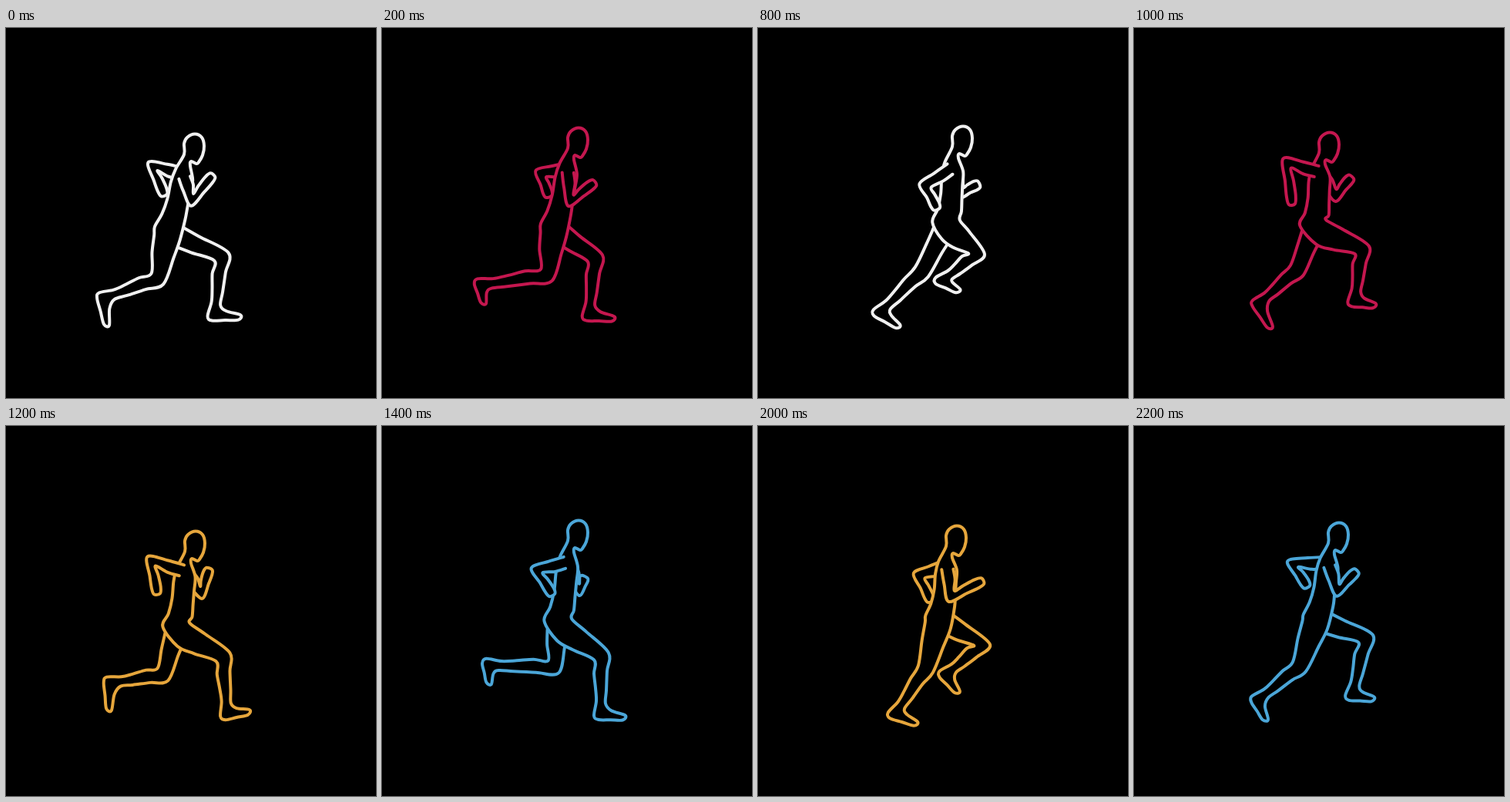
Animation of 480x480 px, one loop 2.4 s. Source, as an HTML page:

```html
<!DOCTYPE html>
<html lang="en">
<head>
<meta charset="utf-8">
<title>Running figure</title>
<style>
html, body { margin: 0; width: 100%; height: 100%; overflow: hidden; background: #000; }
svg { display: block; width: 100%; height: 100%; }
path { fill: #000; stroke-width: 4; stroke-linecap: round; stroke-linejoin: round; }
</style>
</head>
<body>
<svg viewBox="0 0 480 480"></svg>
<script>
const STEP = 200;
const COLORS = ['#f0f0f0', '#c4174f', '#e6a63c', '#4ba6d8'];
const svg = document.querySelector('svg');
const poses = [];

const add = (p, v, k = 1) => [p[0] + v[0] * k, p[1] + v[1] * k];
const mix = (a, b, t) => [a[0] + (b[0] - a[0]) * t, a[1] + (b[1] - a[1]) * t];
const unit = v => v.map(c => c / (Math.hypot(...v) || 1));
const dir = (a, b) => unit([b[0] - a[0], b[1] - a[1]]);
const normal = (a, b) => { const [x, y] = dir(a, b); return [y, -x]; };

// Point at share t of the bone a-b, w pixels towards the front of the body.
const beside = (a, b, t, w) => add(mix(a, b, t), normal(a, b), w);
const joint = (a, b, c, w) => add(b, unit(add(normal(a, b), normal(b, c))), w);

// Outline of a leg, from the back of the thigh round the foot to the front.
function leg(hip, [kx, ky, ax, ay, tx, ty], wide) {
  const knee = [kx, ky], ankle = [ax, ay], toe = [tx, ty];
  const thigh = (t, w) => beside(hip, knee, t, w * wide);
  const shin = (t, w) => beside(knee, ankle, t, w);
  const heel = (down, w) => add(shin(1, w), dir(knee, ankle), down);
  const tip = beside(ankle, toe, 1, -4);
  return [
    thigh(.15, -18), thigh(.5, -15), joint(hip, knee, ankle, -10),
    shin(.35, -9), shin(.65, -7), shin(.92, -6),
    heel(14, -9), heel(19, -3), mix(heel(19, -3), tip, .5), tip,
    beside(ankle, toe, 1, 3), beside(ankle, toe, .45, 0), shin(.97, 6),
    shin(.7, 7), shin(.3, 8), joint(hip, knee, ankle, 11),
    thigh(.5, 14), thigh(.12, 16)
  ];
}

// Outline of an arm, open at the shoulder.
function arm(shoulder, [ex, ey, wx, wy]) {
  const elbow = [ex, ey], wrist = [wx, wy];
  const upper = (t, w) => beside(shoulder, elbow, t, w);
  const lower = (t, w) => beside(elbow, wrist, t, w);
  return [
    upper(.1, -8), upper(.6, -8), joint(shoulder, elbow, wrist, -10),
    lower(.5, -6), lower(.95, -6), lower(1.2, -4), lower(1.2, 4), lower(.95, 6),
    lower(.5, 5), joint(shoulder, elbow, wrist, 6), upper(.5, 7), upper(.15, 7)
  ];
}

function body(head, neck, hip, nearLeg) {
  const torso = (t, w) => beside(neck, hip, t, w);
  const face = [
    [-5, 24], [-4, 18], [3, 21], [6, 19], [11, 10], [13, -2], [10, -13],
    [1, -17.5], [-9, -13], [-13, -5], [-13, 9]
  ].map(p => add(head, p));
  return [
    torso(.1, -12), torso(.3, -14), torso(.55, -13), torso(.78, -15), torso(.98, -20),
    ...leg(hip, nearLeg, 1),
    torso(.78, 16), torso(.6, 15), torso(.4, 14), torso(.2, 13), ...face
  ];
}

// Catmull-Rom curve through the points.
function smooth(pts, closed) {
  const n = pts.length;
  const at = i => pts[closed ? (i + n) % n : Math.max(0, Math.min(n - 1, i))];
  const handle = (i, side) => {
    const a = at(i - 1), b = at(i + 1);
    return add(at(i), [b[0] - a[0], b[1] - a[1]], side / 6);
  };
  let d = 'M' + pts[0];
  for (let i = 1; i < n + (closed ? 1 : 0); i++) {
    d += 'C' + [handle(i - 1, 1), handle(i, -1), at(i)].join(' ');
  }
  return d;
}

// Legs are knee, ankle, toe; arms are elbow, wrist. Nearer parts cover farther ones.
function pose(head, hip, nearLeg, farLeg, nearArm, farArm) {
  const neck = add(head, [-10, 22]);
  const shoulder = mix(neck, hip, .15);
  poses.push([
    smooth(arm(shoulder, farArm)),
    smooth(leg(hip, farLeg, .8)),
    smooth(body(head, neck, hip, nearLeg), true),
    smooth(arm(shoulder, nearArm))
  ]);
}

pose([244, 155], [212, 264], [196, 325, 137, 347, 131, 385], [279, 297, 272, 361, 303, 375], [242, 221, 264, 196], [192, 181, 203, 211]);
pose([254, 147], [225, 260], [213, 320, 139, 332, 132, 357], [276, 299, 270, 361, 300, 377], [246, 222, 271, 204], [208, 190, 215, 214]);
pose([266, 144], [239, 248], [263, 307, 183, 296, 167, 322], [270, 290, 260, 362, 290, 376], [232, 211, 255, 236], [258, 217, 280, 216]);
pose([276, 141], [243, 250], [280, 297, 224, 287, 213, 317], [263, 308, 242, 364, 274, 377], [234, 210, 247, 250], [260, 228, 281, 236]);
pose([265, 145], [246, 256], [283, 293, 247, 322, 260, 341], [212, 316, 166, 362, 182, 387], [219, 205, 230, 230], [264, 212, 283, 204]);
pose([253, 153], [235, 260], [295, 288, 288, 343, 312, 360], [211, 314, 170, 351, 177, 388], [200, 177, 204, 220], [262, 215, 279, 197]);
pose([245, 154], [223, 265], [281, 300, 286, 362, 315, 371], [203, 322, 146, 332, 134, 368], [190, 177, 195, 211], [253, 214, 262, 190]);
pose([254, 140], [230, 258], [284, 299, 284, 362, 314, 378], [222, 312, 149, 311, 139, 334], [203, 188, 218, 214], [256, 210, 262, 198]);
pose([260, 137], [239, 235], [279, 298, 273, 361, 304, 376], [262, 300, 211, 270, 192, 289], [215, 195, 239, 216], [251, 218, 261, 218]);
pose([261, 148], [238, 248], [241, 310, 235, 366, 265, 381], [284, 297, 222, 313, 207, 334], [230, 215, 255, 230], [260, 214, 273, 214]);
pose([257, 147], [237, 250], [217, 315, 184, 365, 205, 386], [290, 284, 252, 316, 259, 345], [252, 219, 285, 204], [211, 195, 222, 222]);
pose([265, 143], [239, 250], [214, 312, 169, 349, 171, 381], [300, 276, 286, 338, 310, 354], [265, 211, 285, 192], [208, 180, 222, 204]);

const parts = poses[0].map(() =>
  svg.appendChild(document.createElementNS('http://www.w3.org/2000/svg', 'path')));
const start = performance.now();
let shown = -1;

function draw() {
  const i = Math.floor((performance.now() - start) / STEP) % poses.length;
  if (i !== shown) {
    parts.forEach((part, k) => part.setAttribute('d', poses[i][k]));
    svg.setAttribute('stroke', COLORS[i % COLORS.length]);
    shown = i;
  }
  requestAnimationFrame(draw);
}
draw();
</script>
</body>
</html>
```
